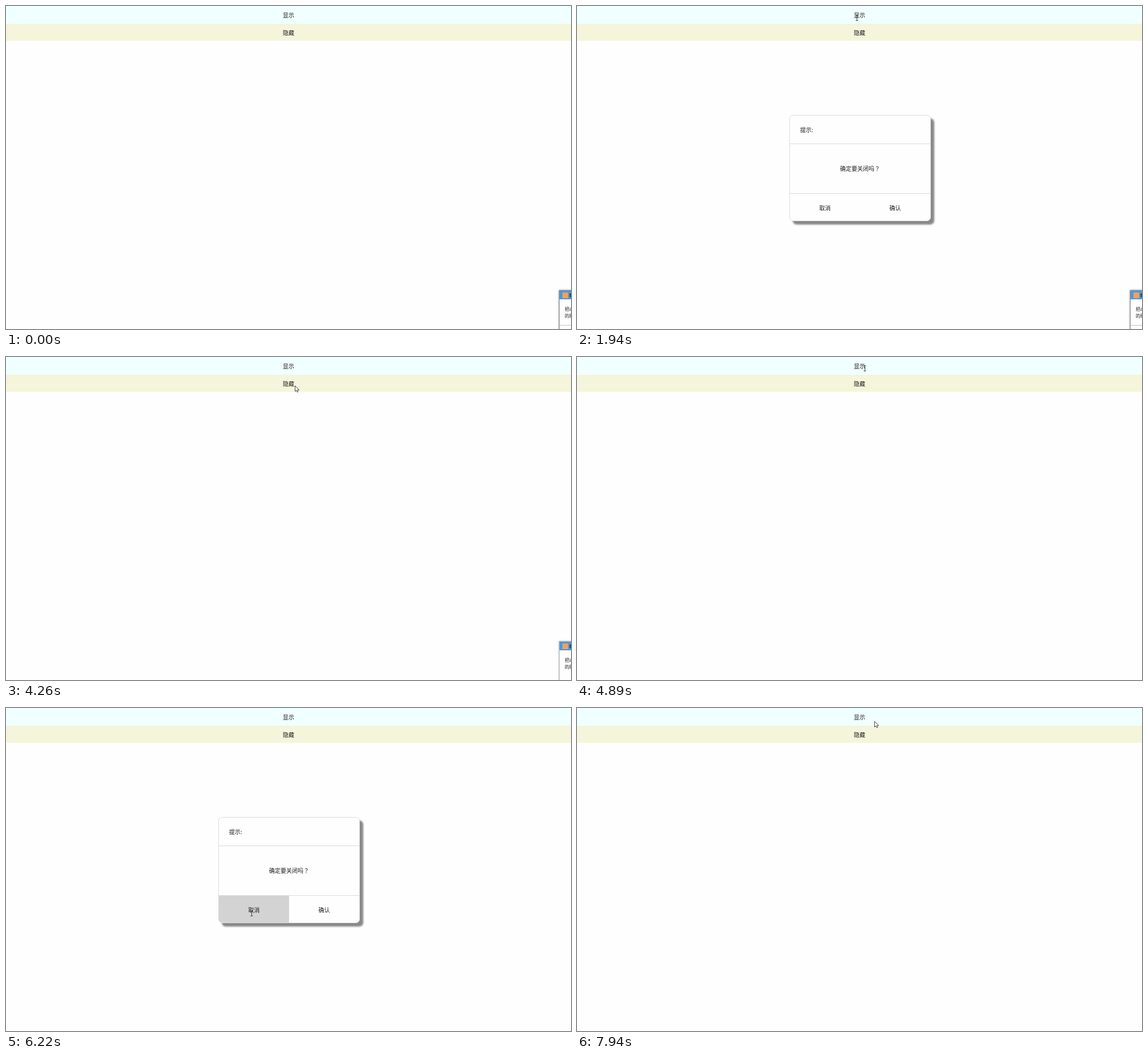
Recreate the animation shown at these times as an HTML page. Size 990 px wide and 566 px high, loop 8 s.

```html
<!DOCTYPE html>
<html lang="zh-CN">
<head>
<meta charset="utf-8">
<title>弹窗演示</title>
<style>
html, body { margin: 0; width: 100%; height: 100%; overflow: hidden; }
body { background: #fefefe; color: #1c1c1c; font: 10px/20px "Noto Sans CJK SC", "Noto Sans CJK", "Noto Sans", sans-serif; }
#stage { position: absolute; left: 0; top: 0; width: 990px; height: 566px; overflow: hidden; }
#stage div { position: absolute; box-sizing: border-box; white-space: nowrap; }
#stage span { padding: 3px 0; }
.bar { left: 0; width: 990px; height: 31px; line-height: 31px; text-align: center; }
#show { top: 0; background: #f0ffff; }
#hide { top: 31px; height: 30.4px; background: #f5f5dc; }

#dialog { left: 372px; top: 191px; width: 248px; height: 186px; border: 1px solid #dcdcdc; border-radius: 7px; background: #fefefe; box-shadow: 6px 6px 3px #888; }
#clip { inset: 0; overflow: hidden; border-radius: 6px; }
#title { left: 0; top: 0; width: 246px; height: 50px; padding-left: 18px; line-height: 49px; border-bottom: 1px solid #dcdcdc; }
#message { left: 0; top: 50px; width: 246px; height: 87px; line-height: 86px; text-align: center; border-bottom: 1px solid #dcdcdc; }
.mark { font-family: "Noto Sans CJK JP", "Noto Sans CJK", sans-serif; }
.button { top: 137px; width: 123px; height: 48px; line-height: 49px; text-align: center; }
#cancel { left: 0; }
#confirm { left: 123px; }
#cancel.pressed { background: #d3d3d3; }

#toast { left: 458px; top: 469px; width: 87px; height: 24px; line-height: 24px; text-align: center; border-radius: 6px; background: #8fbc8f; box-shadow: 6px 6px 3px #888; }

#popup { left: 969px; top: 498px; width: 40px; height: 80px; border: 1px solid #8a8a8a; background: #fefefe; font-size: 8px; line-height: 12px; box-shadow: 0 0 3px #777; }
#popup.faded { border-color: #b0b0b0; box-shadow: 0 0 3px #aaa; }
#popup.faded #rule { display: none; }
#head { left: 0; top: 0; width: 40px; height: 15px; background: #4d98dc; }
#icon { left: 5px; top: 3px; width: 10px; height: 10px; background: #f0a15c; }
#letter { left: 17px; top: 2px; font-weight: bold; color: #10233c; }
#note { left: 9px; top: 26px; }
#rule { left: 0; top: 60px; width: 40px; height: 1px; background: #c4c4c4; }
svg { position: absolute; left: 0; top: 0; overflow: visible; pointer-events: none; }
</style>
</head>
<body>
<div id="stage">
  <div class="bar" id="show"><span>显示</span></div>
  <div class="bar" id="hide"><span>隐藏</span></div>
  <div id="popup">
    <div id="head"></div><div id="icon"></div><div id="letter">E</div>
    <div id="note">把a<br>的时</div><div id="rule"></div>
  </div>
  <div id="dialog"><div id="clip">
    <div id="title"><span>提示:</span></div>
    <div id="message"><span>确定要关闭吗<span class="mark" lang="ja">？</span></span></div>
    <div class="button" id="cancel"><span>取消</span></div>
    <div class="button" id="confirm"><span>确认</span></div>
  </div></div>
  <div id="toast"><span>点击了取消按钮!</span></div>
  <svg width="1" height="1">
    <g id="cursor">
      <path id="arrow" d="M.5 .5V10.3L2.8 8.3L4.3 11.6L5.9 10.9L4.5 7.8H7.6Z" fill="#fff" stroke="#333" stroke-width=".9"/>
      <path id="beam" d="M-2 -4.5H2M0 -4.5V4.5M-2 4.5H2" fill="none" stroke="#444"/>
    </g>
  </svg>
</div>
<script>
const LOOP = 8000, STEP = 78;
const $ = id => document.getElementById(id);

// The pointer enters at a corner and glides from stop to stop.
const entry = { x: 940, y: 566 };
const glides = [
  { from: 370, to: 1160, x: 474, y: 48 },
  { from: 1220, to: 1610, x: 490, y: 21 },
  { from: 2010, to: 2770, x: 467, y: 344 },
  { from: 2930, to: 3250, x: 473, y: 175 },
  { from: 3250, to: 3950, x: 506, y: 50 },
  { from: 4560, to: 4800, x: 504, y: 20 },
  { from: 5460, to: 6140, x: 430, y: 360 },
  { from: 6780, to: 7140, x: 510, y: 176 },
  { from: 7140, to: 7940, x: 521, y: 23 }
];

const between = (t, from, to) => t >= from && t < to;
const toggle = (id, on) => { $(id).style.display = on ? "" : "none"; };
const easeOut = u => Math.sin(u * Math.PI / 2);

function pointerAt(t) {
  const i = glides.findLastIndex(g => g.from <= t);
  if (i < 0) return null;
  const a = glides[i - 1] || entry, b = glides[i];
  const held = Math.floor((t - b.from) / STEP) * STEP + STEP;
  const u = easeOut(Math.min(1, held / (b.to - b.from)));
  return { x: Math.round(a.x + (b.x - a.x) * u), y: Math.round(a.y + (b.y - a.y) * u) };
}

function drawPointer(pos) {
  toggle("cursor", pos);
  if (!pos) return;
  const under = document.elementFromPoint(pos.x, pos.y);
  const onText = Boolean(under && under.tagName === "SPAN");
  toggle("beam", onText);
  toggle("arrow", !onText);
  $("cursor").setAttribute("transform", `translate(${pos.x + (onText ? 0.5 : 0)} ${pos.y})`);
}

function draw(t) {
  toggle("dialog", between(t, 1940, 4260) || between(t, 5200, 6370));
  toggle("toast", between(t, 6370, 7370));
  toggle("popup", t < 4560);
  $("popup").classList.toggle("faded", t >= 2010);
  $("cancel").classList.toggle("pressed", between(t, 6220, 6370));
  drawPointer(pointerAt(t));
}

const begin = performance.now();
function frame() {
  draw((performance.now() - begin) % LOOP);
  requestAnimationFrame(frame);
}
frame();
</script>
</body>
</html>
```
